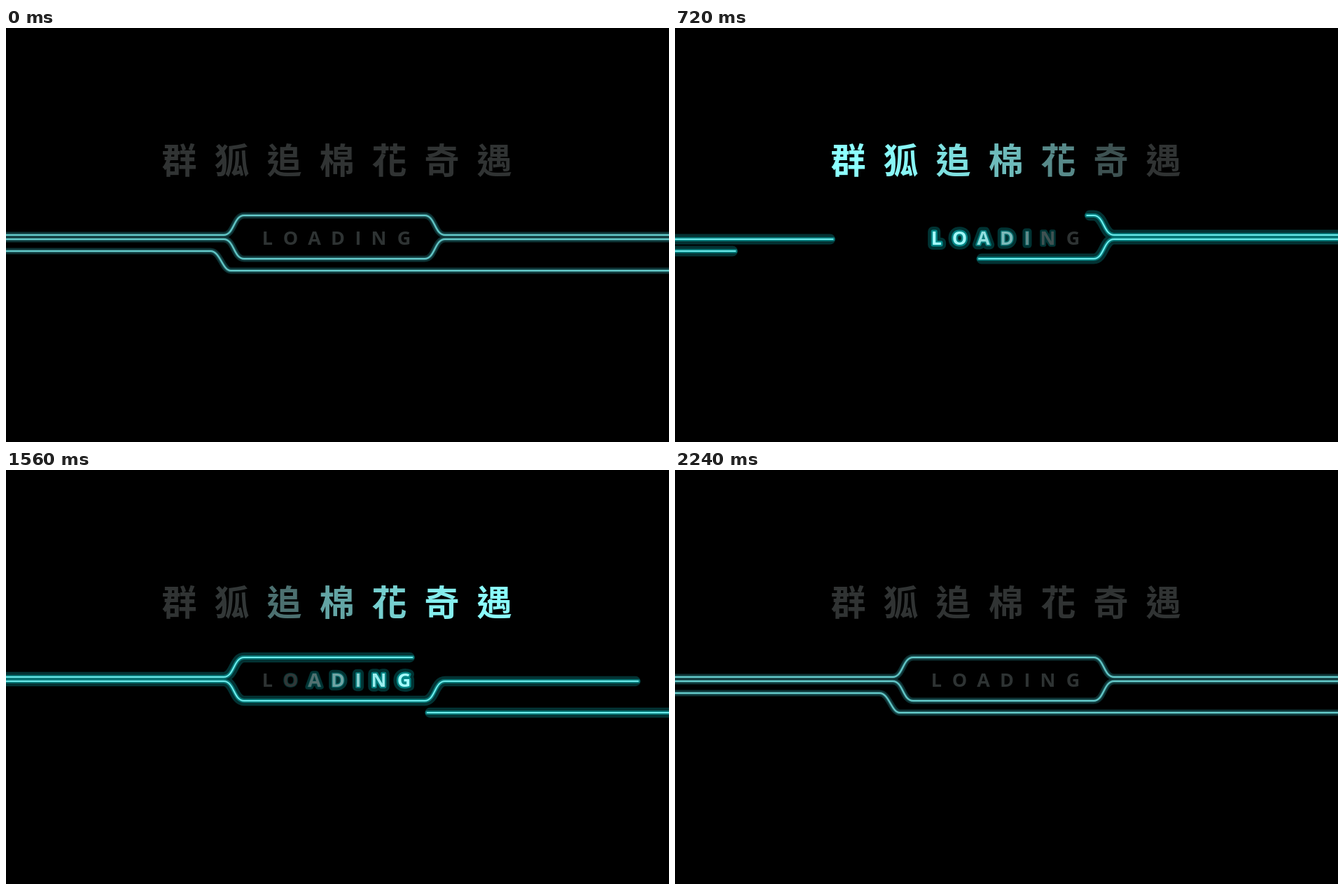
An HTML page that plays this animation: 947 px wide and 592 px high, repeating every 2400 ms.

```html
<!DOCTYPE html>
<html lang="zh-Hant">
<head>
<meta charset="utf-8">
<title>Loading</title>
<style>
  html, body { margin: 0; width: 100%; height: 100%; overflow: hidden; background: #000; }
  svg { display: block; width: 100%; height: 100%; }
  path { fill: none; stroke-linecap: round; }
  text { text-anchor: middle; stroke-linejoin: round; }
  .title { font: 700 50px "Noto Sans CJK TC", "Noto Sans CJK", sans-serif; }
  .label { font: 700 27px "Open Sans", "Noto Sans", sans-serif; }
</style>
</head>
<body>
<svg id="stage" viewBox="0 0 947 592"></svg>
<script>
const LOOP = 2400, STEP = 40, LAST = 2240;
const PAD = 20; // how far the lines run past the stage edges
const stage = document.getElementById('stage');

function add(parent, tag, attrs = {}, text = '') {
  const el = document.createElementNS('http://www.w3.org/2000/svg', tag);
  for (const key in attrs) el.setAttribute(key, attrs[key]);
  el.textContent = text;
  parent.appendChild(el);
  return el;
}

const mix = (a, b, k) => a + (b - a) * k;
const blend = (from, to, k) => `rgb(${from.map((v, i) => Math.round(mix(v, to[i], k)))})`;

// Each gap edge follows a cosine ease; keys are [time, phase].
function ease(keys, t) {
  if (t <= keys[0][0]) return 0;
  for (let i = 1; i < keys.length; i++) {
    const [t0, p0] = keys[i - 1], [t1, p1] = keys[i];
    if (t < t1) return (1 - Math.cos(Math.PI * mix(p0, p1, (t - t0) / (t1 - t0)))) / 2;
  }
  return 1;
}

const lines = [
  { d: 'M-20 296H311C326 296 325 268 340 268H598C613 268 612 296 627 296H967',
    tail: [[745, 0], [1040, .217], [1560, .572], [1880, .844], [2070, 1]],
    head: [[0, 0], [320, .262], [720, .574], [1040, .831], [1250, 1]] },
  { d: 'M-20 302H311C326 302 325 330 340 330H598C613 330 612 302 627 302H967',
    tail: [[225, 0], [1765, 1]],
    head: [[0, 0], [320, .215], [1540, 1]] },
  { d: 'M967 347H321C309 347 306 319 292 319H-20',
    tail: [[1190, 0], [2090, 1]],
    head: [[0, 0], [320, .366], [900, 1]] }
];

// From the wide glow to the bright core: widths and colours at rest and at full glow.
const layers = [
  { width: [9, 16.5], from: [12, 48, 50], to: [0, 51, 51] },
  { width: [4.5, 6.5], from: [38, 98, 100], to: [0, 128, 128] },
  { width: [2, 2.2], from: [102, 204, 204], to: [112, 250, 250] }
];

const strokes = [];
for (const layer of layers)
  for (const line of lines)
    for (const ahead of [false, true])
      strokes.push({ layer, line, ahead, el: add(stage, 'path', { d: line.d }) });
for (const line of lines) {
  const { el } = strokes.find(s => s.line === line);
  line.length = el.getTotalLength() - 2 * PAD;
}

const title = [...'群狐追棉花奇遇'].map((ch, i) =>
  add(stage, 'text', { class: 'title', x: 247.5 + 75 * i, y: 208 }, ch));

const labelX = [373.3, 406.5, 440.5, 474, 503, 532.5, 568.5];
const label = [...'LOADING'].map((ch, i) => {
  const pos = { class: 'label', x: labelX[i], y: 310 };
  return {
    halo: add(stage, 'text', { ...pos, fill: 'none', stroke: '#003333', 'aria-hidden': true }, ch),
    rim: add(stage, 'text', { ...pos, fill: 'none', 'aria-hidden': true }, ch),
    face: add(stage, 'text', pos, ch)
  };
});

function drawStroke({ layer, line, ahead, el }, t, glow) {
  const width = mix(...layer.width, glow);
  const inset = Math.max(2.5, width / 2 - 1);
  const tail = ease(line.tail, t) * line.length;
  const head = ease(line.head, t) * line.length;
  const end = line.length + PAD;
  let from = -PAD, to = end;
  if (ahead) from = head <= 0 ? -PAD : head >= line.length ? end : head + inset;
  else to = tail <= 0 ? -PAD : tail >= line.length ? end : tail - inset;
  const shown = to > from;
  el.style.display = shown ? '' : 'none';
  if (!shown) return;
  el.setAttribute('stroke', blend(layer.from, layer.to, glow));
  el.setAttribute('stroke-width', width);
  el.setAttribute('stroke-dasharray', `${to - from} 9999`);
  el.setAttribute('stroke-dashoffset', -(from + PAD));
}

// Light passes from the first letter to the last.
function light(i, t) {
  const p = (t - 130 * i) / 1440;
  return p > 0 && p < 1 ? Math.sin(Math.PI * p) : 0;
}

function drawLetter({ halo, rim, face }, k) {
  halo.style.display = rim.style.display = k ? '' : 'none';
  halo.setAttribute('stroke-width', 14 * Math.sqrt(k));
  rim.setAttribute('stroke-width', 5 * k);
  rim.setAttribute('stroke', blend([0, 51, 51], [0, 136, 136], k));
  face.setAttribute('fill', blend([46, 51, 51], [165, 255, 255], k));
}

function draw(t) {
  const glow = Math.min(1, 1.1 * (1 - Math.cos(2 * Math.PI * t / LAST)) / 2);
  for (const stroke of strokes) drawStroke(stroke, t, glow);
  title.forEach((el, i) =>
    el.setAttribute('fill', blend([48, 51, 51], [140, 255, 255], light(i, t))));
  label.forEach((letter, i) => drawLetter(letter, light(i, t)));
}

const start = performance.now();
function tick() {
  const t = (performance.now() - start) % LOOP;
  draw(Math.min(LAST, Math.floor(t / STEP) * STEP));
  requestAnimationFrame(tick);
}
tick();
</script>
</body>
</html>
```
